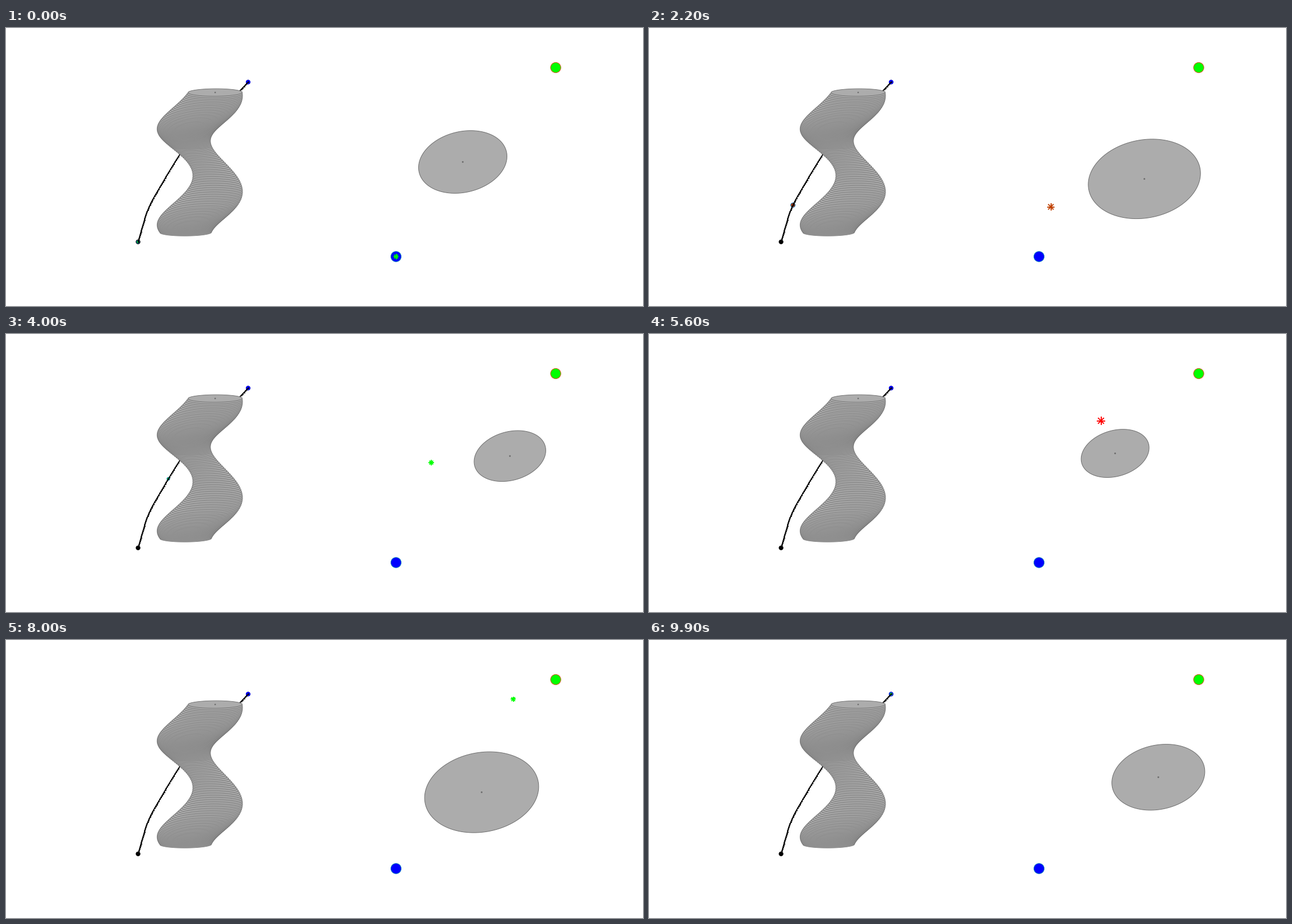
Write a matplotlib script that moves like this. It is 1131 px wide and 495 px high and loops after 10000 ms.

```python
import numpy as np
import matplotlib.pyplot as plt
from matplotlib.animation import FuncAnimation
from matplotlib.collections import LineCollection, PolyCollection
from matplotlib.patches import Circle, Polygon

W, H, DPI = 1131, 495, 64
PX = 72 / DPI               # one pixel in points
FRAMES = 100
FACE, EDGE = "#acacac", "#6e6e6e"
BLUE_RIM, ORANGE_RIM = "#0072bd", "#d95319"
START, GOAL = (692.5, 407), (976, 70.5)

# Clock: piecewise constant rate, one unit is 1/66 of an orbit
CLOCK_KEYS = [0, 22, 44, 57, 99], [0, 21.5, 44.2, 57.95, 97.2]

# Agent way points: frame, x, y
WAY = np.array([
    (0, *START), (11, 701.3, 364.5), (17, 706.5, 340),
    (22, 713.5, 318.5), (33, 738.3, 264.5), (40, 755, 229),
    (56, 802.5, 154.5), (60, 820, 143), (72, 868.5, 120),
    (89, 936.5, 89), (99, *GOAL)])
SLOPE = np.gradient(WAY[:, 1:], WAY[:, 0], axis=0)
THETA = np.linspace(0, 2 * np.pi, 121)


def clock(i):
    return np.interp(i, *CLOCK_KEYS)


def agent(i):
    """Cubic Hermite curve through the way points."""
    k = min(np.searchsorted(WAY[:, 0], i, side="right") - 1, len(WAY) - 2)
    h = WAY[k + 1, 0] - WAY[k, 0]
    s = (i - WAY[k, 0]) / h
    p, q = WAY[k, 1:], WAY[k + 1, 1:]
    return (p * (1 + 2 * s) * (1 - s) ** 2 + q * s * s * (3 - 2 * s)
            + h * s * (1 - s) * (SLOPE[k] * (1 - s) - SLOPE[k + 1] * s))


def obstacle(i):
    """Centre, half extents and correlation of the moving ellipse."""
    a = clock(i) * np.pi / 33
    rx = 78.5 + 23.8 * np.sin(a)
    centre = np.array([858 - 47 * np.cos(a), 238.5 + 34 * np.sin(a)])
    return centre, rx, 0.711 * rx, -14 / rx


def outline(i):
    c, rx, ry, rho = obstacle(i)
    x = np.cos(THETA)
    y = rho * x + np.sqrt(1 - rho ** 2) * np.sin(THETA)
    return c + np.column_stack([rx * x, ry * y])


def lift(points, i):
    """Oblique view of the plane, with time as the height."""
    dx, dy = (np.asarray(points) - START).T
    return np.column_stack([234.5 + 0.567 * dx - 0.103 * dy,
                            380.8 + 0.021 * dx + 0.115 * dy - 2.59 * clock(i)])


def risk(i):
    c, rx, ry, rho = obstacle(i)
    u, v = (agent(i) - c) / (rx, ry)
    m2 = (u * u + v * v - 2 * rho * u * v) / (1 - rho ** 2)
    return np.clip((4.4 - m2) / 1.86, 0, 1)


def disc(xy, r, face, edge, z):
    return ax.add_patch(Circle(xy, r, fc=face, ec=edge, lw=PX, zorder=z))


fig = plt.figure(figsize=(W / DPI, H / DPI), dpi=DPI, facecolor="white")
ax = fig.add_axes([0, 0, 1, 1])
ax.set_xlim(0, W)
ax.set_ylim(H, 0)
ax.axis("off")

# Left: space-time view
steps = range(FRAMES)
path = np.vstack([lift([agent(i)], i) for i in steps])
disc(path[0], 3.6, "black", "black", 1)
disc(path[-1], 3.6, "blue", "#0000d0", 1)
bead = disc(path[0], 3, "lime", BLUE_RIM, 2)
ax.plot(*path.T, color="black", lw=1.7 * PX, marker="o", ms=2.8 * PX,
        mew=0, zorder=3)
ax.add_collection(PolyCollection([lift(outline(i), i) for i in steps],
                                 facecolors=FACE, edgecolors=EDGE,
                                 linewidths=0.9 * PX, zorder=4))
top = lift([obstacle(FRAMES - 1)[0]], FRAMES - 1)[0]
disc(top, 0.8, EDGE, EDGE, 5)

# Right: plane view
blob = ax.add_patch(Polygon(outline(0), fc=FACE, ec=EDGE, lw=PX, zorder=1))
core = disc((0, 0), 1, EDGE, EDGE, 2)
disc(START, 9.1, "blue", BLUE_RIM, 3)
disc(GOAL, 9.1, "lime", ORANGE_RIM, 3)
star = LineCollection([], linewidths=1.9 * PX, capstyle="butt", zorder=4)
ax.add_collection(star)
ANGLES = np.arange(4) * np.pi / 4
ARMS = np.column_stack([np.cos(ANGLES), np.sin(ANGLES)])


def update(i):
    red = risk(i)
    color = (red, 1 - red, 0)
    pos = agent(i)
    arms = (4.7 + 2.7 * red) * ARMS
    star.set_segments([(pos - d, pos + d) for d in arms])
    star.set_color([color])
    blob.set_xy(outline(i))
    core.center = obstacle(i)[0]
    bead.center = path[i]
    bead.set_radius(2.5 + 1.9 * red)
    bead.set_facecolor(color)
    return star, blob, core, bead


anim = FuncAnimation(fig, update, frames=FRAMES, interval=100,
                     repeat=True, repeat_delay=0, blit=False)
plt.show()
```
